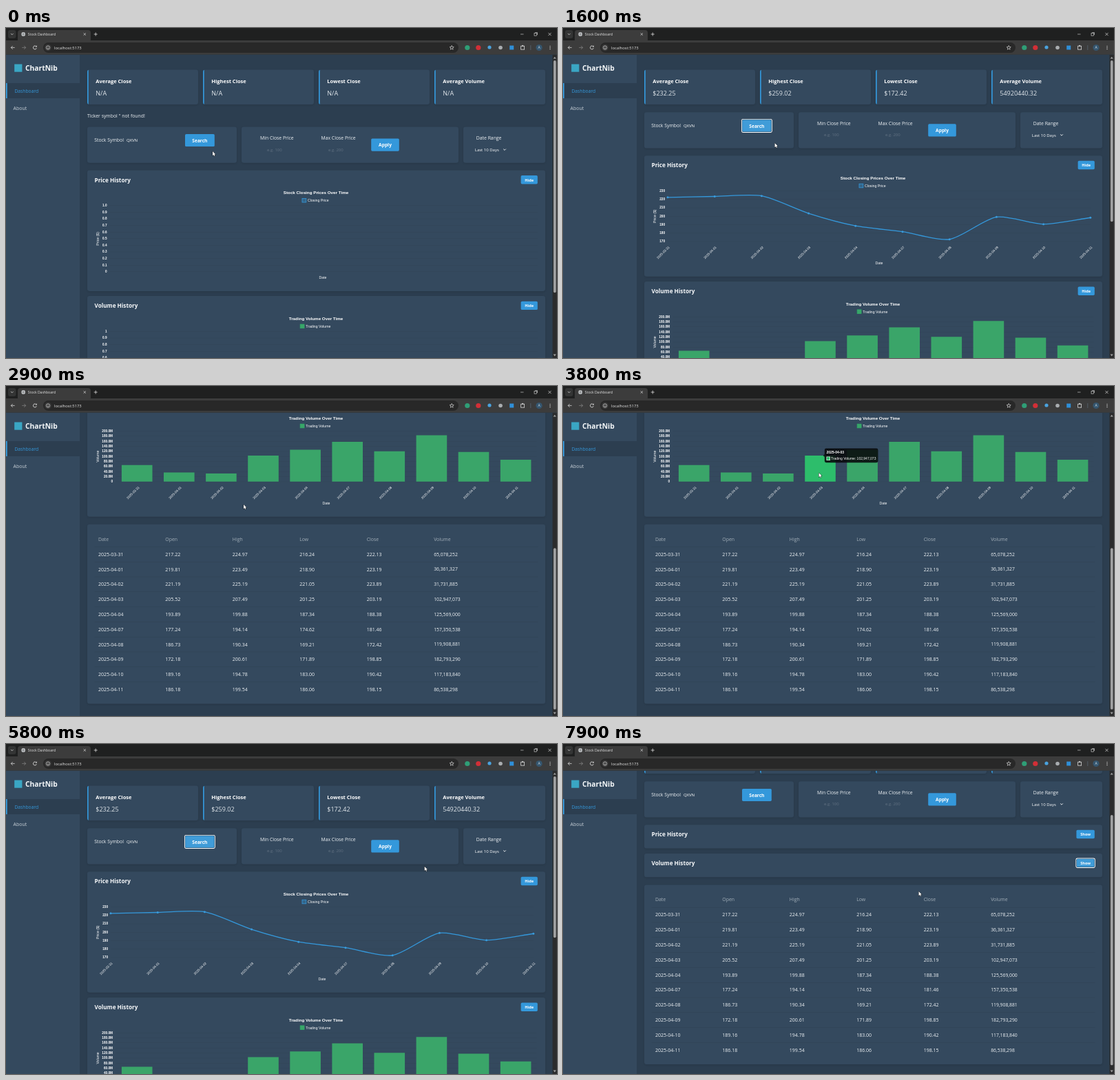
These frames come from a looping animation (800x479 px, 8 s). An HTML page with a canvas:

```html
<!DOCTYPE html>
<html lang="en">
<head>
<meta charset="utf-8">
<title>Stock Dashboard</title>
<style>
html, body { margin: 0; width: 100%; height: 100%; overflow: hidden; background: #2c3e50; }
canvas { display: block; width: 800px; height: 479px; }
</style>
</head>
<body>
<canvas id="stage"></canvas>
<script>
const W = 800, H = 479, LOOP = 8000, STEP = 100;
const canvas = document.getElementById('stage');
const ctx = canvas.getContext('2d');
const dpr = window.devicePixelRatio || 1;
canvas.width = W * dpr;
canvas.height = H * dpr;

const UI = '"Open Sans", "Noto Sans", sans-serif';
const CHART = '"Liberation Sans", Arial, sans-serif';
const CARD = '#34495e', PAGE = '#2c3e50', BLUE = '#3498db', GREEN = '#3aa569';
const TOP = 39;

// day, open, high, low, close, volume
const rows = [
  ['03-31', 217.22, 224.97, 216.24, 222.13, 65078252],
  ['04-01', 219.81, 223.49, 218.90, 223.19, 36361327],
  ['04-02', 221.19, 225.19, 221.05, 223.89, 31731885],
  ['04-03', 205.52, 207.49, 201.25, 203.19, 102947073],
  ['04-04', 193.89, 199.88, 187.34, 188.38, 125569000],
  ['04-07', 177.24, 194.14, 174.62, 181.46, 157350538],
  ['04-08', 186.73, 190.34, 169.21, 172.42, 119908881],
  ['04-09', 172.18, 200.61, 171.89, 198.85, 182793290],
  ['04-10', 189.16, 194.78, 183.00, 190.42, 117183840],
  ['04-11', 186.18, 199.54, 186.06, 198.15, 86538298]
];
const dates = rows.map(r => '2025-' + r[0]);
const commas = n => n.toLocaleString('en-US');

// Timeline
const LOADED = 500, SEARCH_CLICK = 400, PRICE_HIDE = 6300, VOLUME_HIDE = 7100;
const pointer = [
  [0, 300, 179], [350, 285, 165], [800, 285, 165], [1600, 307.5, 167], [2300, 341.5, 175.5],
  [2900, 345, 172], [3500, 371.5, 126], [4100, 371.5, 126], [5000, 424, 153],
  [5400, 424, 153], [6150, 758, 198], [6400, 760, 199], [6700, 770.5, 221],
  [7000, 760, 239], [7250, 758, 238], [7900, 516.5, 214]
];
const scrolling = [
  [0, 0], [1750, 0], [2300, 265], [2650, 353.7], [4200, 353.7], [4850, 133.6],
  [5350, 133.6], [5800, 0], [7350, 0], [7800, 68]
];

function track(keys, t) {
  let i = 0;
  while (i < keys.length - 1 && keys[i + 1][0] <= t) i++;
  const a = keys[i], b = keys[i + 1];
  if (!b) return a.slice(1);
  const u = (t - a[0]) / (b[0] - a[0]), k = u * u * (3 - 2 * u);
  return a.slice(1).map((v, j) => v + (b[j + 1] - v) * k);
}

// Drawing helpers; text y is the middle of the capitals
function text(s, x, y, size, color = '#eef2f5', { weight = 400, font = UI, align = 'left' } = {}) {
  ctx.font = `${weight} ${size}px ${font}`;
  ctx.textAlign = align;
  ctx.fillStyle = color;
  ctx.fillText(s, x, y + size * 0.36);
}
function label(s, x, y, size, align = 'left', weight = 400) {
  text(s, x, y, size, '#fff', { font: CHART, align, weight });
}
function turned(s, x, y, size, angle, align) {
  ctx.save();
  ctx.translate(x, y);
  ctx.rotate(angle);
  label(s, 0, 0, size, align);
  ctx.restore();
}
function box(x, y, w, h, color, r = 0) {
  ctx.fillStyle = color;
  ctx.beginPath();
  ctx.roundRect(x, y, w, h, r);
  ctx.fill();
}
function disc(x, y, r, color) {
  ctx.fillStyle = color;
  ctx.beginPath();
  ctx.arc(x, y, r, 0, 7);
  ctx.fill();
}
function ring(x, y, r, from = 0, to = 7) {
  ctx.beginPath();
  ctx.arc(x, y, r, from, to);
  ctx.stroke();
}
function path(points, color, width = 0.8) {
  ctx.strokeStyle = color;
  ctx.lineWidth = width;
  ctx.beginPath();
  points.forEach(([x, y], i) => i ? ctx.lineTo(x, y) : ctx.moveTo(x, y));
  ctx.stroke();
}
function poly(points, color) {
  ctx.fillStyle = color;
  ctx.beginPath();
  points.forEach(([x, y]) => ctx.lineTo(x, y));
  ctx.fill();
}
function card(x, y, w, h) {
  ctx.save();
  ctx.shadowColor = 'rgba(0,0,0,.12)';
  ctx.shadowBlur = 3 * dpr;
  ctx.shadowOffsetY = dpr;
  box(x, y, w, h, CARD, 3.3);
  ctx.restore();
}
function button(s, x, y, w, h, size, focused) {
  if (focused) {
    box(x - 1, y - 1, w + 2, h + 2, '#fff', 2.4);
    box(x - 0.1, y - 0.1, w + 0.2, h + 0.2, '#24384a', 1.8);
    box(x + 0.3, y + 0.3, w - 0.6, h - 0.6, '#409cd8', 1.6);
  } else {
    box(x, y, w, h, BLUE, 1.7);
  }
  text(s, x + w / 2, y + h / 2 + 0.3, size, '#fff', { weight: 700, align: 'center' });
}

// Browser frame
function browser() {
  box(0, 0, W, 19, '#1f2020');
  box(3, 3, 11.5, 12, '#343535', 3);
  path([[7, 8], [8.8, 9.8], [10.6, 8]], '#d5d5d5');
  box(17, 3, 106, 18, '#3c3c3c', 4);
  box(0, 18, W, 20.5, '#3c3c3c');
  box(0, 38, W, 1, '#333a40');
  disc(25.2, 9, 2.9, '#c6c9cc');
  path([[22.6, 9], [27.8, 9]], '#555', 0.5);
  path([[25.2, 6.4], [25.2, 11.6]], '#555', 0.5);
  text('Stock Dashboard', 31.8, 9, 5.1, '#e4e4e4');
  cross(114.3, 9, 1.7);
  path([[127.7, 9], [132.7, 9]], '#ddd');
  path([[130.2, 6.5], [130.2, 11.5]], '#ddd');
  path([[747, 9], [751.5, 9]], '#ddd', 0.6);
  ctx.strokeRect(767, 7.6, 3.5, 3.5);
  path([[768.2, 6.6], [771.5, 6.6], [771.5, 10]], '#ddd', 0.6);
  cross(789.5, 9, 2.1);

  arrow(10, 28.4, -1, '#d8d8d8');
  arrow(26, 28.4, 1, '#858585');
  ctx.strokeStyle = '#d8d8d8';
  ctx.lineWidth = 0.9;
  ring(42, 28.4, 2.5, 0.3, 5.6);
  poly([[42.6, 27.6], [44.9, 27.6], [44.9, 25.3]], '#d8d8d8');
  box(54, 21, 603, 15, '#282828', 7.5);
  disc(61, 28.5, 4.8, '#3b3b3b');
  ctx.lineWidth = 0.7;
  ring(61, 28.5, 2.6);
  path([[61, 28.2], [61, 30]], '#d8d8d8', 0.7);
  text('localhost:5173', 70, 28.6, 5.9, '#e6e6e6');
  star(647.2, 28.6);

  disc(669.8, 28.5, 3.6, '#2f9e76');
  disc(685.8, 28.5, 3.6, '#d22f36');
  disc(702, 28, 2.6, '#4aa3df');
  disc(718, 28.5, 2.8, '#a9adb0');
  box(731.2, 25.5, 6, 6, '#2f8fd8');
  ctx.strokeStyle = '#d8d8d8';
  ctx.lineWidth = 0.8;
  ctx.strokeRect(747.6, 26.2, 5, 5);
  disc(750.1, 25.8, 1, '#d8d8d8');
  box(761.5, 25, 0.7, 7, '#5a6a78');
  disc(774, 28.5, 4.6, '#35566f');
  text('A', 774, 28.6, 5, '#d8e4ec', { align: 'center' });
  for (const dy of [-2.2, 0, 2.2]) disc(790, 28.5 + dy, 0.65, '#d8d8d8');
}
function cross(x, y, r) {
  path([[x - r, y - r], [x + r, y + r]], '#ddd', 0.7);
  path([[x - r, y + r], [x + r, y - r]], '#ddd', 0.7);
}
function arrow(x, y, dir, color) {
  path([[x - 2.7, y], [x + 2.7, y]], color);
  path([[x + dir * 0.3, y - 2.4], [x + dir * 2.7, y], [x + dir * 0.3, y + 2.4]], color);
}
function star(x, y) {
  const pts = [];
  for (let i = 0; i <= 10; i++) {
    const a = i * Math.PI / 5 - Math.PI / 2, r = i % 2 ? 1.4 : 3.2;
    pts.push([x + r * Math.cos(a), y + r * Math.sin(a)]);
  }
  path(pts, '#d8d8d8', 0.7);
}

function sidebar() {
  box(0, TOP, 107, H - TOP, CARD);
  box(12.2, 52.5, 11.2, 11.2, '#3aa6c4');
  text('ChartNib', 28, 58.6, 10.3, '#f4f7f9', { weight: 700 });
  box(0, 80, 107, 22, PAGE);
  box(0, 80, 1.8, 22, BLUE);
  text('Dashboard', 12.4, 91.2, 6.75, BLUE);
  text('About', 10.5, 116.4, 7, '#c9d1d8');
}

function scrollbar(scroll, height) {
  box(793.5, TOP, 6.5, H - TOP, '#2b2c2d');
  const view = H - TOP, scale = 423 / height;
  box(794.9, 47 + scroll * scale, 3.8, view * scale, '#a0a1a2', 1.9);
  poly([[794.6, 44.6], [798.8, 44.6], [796.7, 41.8]], '#a0a1a2');
  poly([[794.6, 473.6], [798.8, 473.6], [796.7, 476.4]], '#a0a1a2');
}

// Page parts
function stats(loaded) {
  const items = [['Average Close', '$232.25'], ['Highest Close', '$259.02'],
    ['Lowest Close', '$172.42'], ['Average Volume', '54920440.32']];
  items.forEach(([name, value], i) => {
    const x = 118 + i * 168;
    card(x, 60.5, 161, 50.5);
    ctx.save();
    ctx.beginPath();
    ctx.roundRect(x, 60.5, 161, 50.5, 3.3);
    ctx.clip();
    box(x, 60.5, 1.7, 50.5, BLUE);
    ctx.restore();
    text(name, x + 12.3, 77.3, 7.5, '#fff', { weight: 700 });
    text(loaded ? value : 'N/A', x + 12.3, 94.3, 9, '#dfe5ea');
  });
}

function controls(y, focused) {
  card(118, y, 217, 52.3);
  card(342, y, 315, 52.3);
  card(664, y, 119, 52.3);
  text('Stock Symbol', 128.3, y + 19.2, 6.85);
  text('QXVN', 175, y + 19.4, 6, '#fff');
  button('Search', 260, y + 10.7, 42.8, 18, 6.6, focused);
  const dim = 'rgba(170,180,190,.38)';
  text('Min Close Price', 369, y + 16.6, 6.85);
  text('Max Close Price', 457.5, y + 16.6, 6.85);
  text('e.g. 100', 379, y + 33, 6, dim);
  text('e.g. 200', 468, y + 33, 6, dim);
  button('Apply', 530.2, y + 17, 40.6, 18.4, 6.7);
  text('Date Range', 682.8, y + 16.6, 6.85);
  text('Last 10 Days', 680.8, y + 33.2, 6, '#fff');
  path([[722.2, y + 32.2], [724, y + 34], [725.8, y + 32.2]], '#fff', 0.9);
}

function panel(y, title, shown, focused) {
  card(118, y, 665, shown ? 175.5 : 34.4);
  text(title, 128.5, y + 14.3, 8.2, '#f6f8fa', { weight: 700 });
  if (shown) button('Hide', 747.6, y + 7.6, 24.2, 12.4, 5.6, focused);
  else button('Show', 745.4, y + 7.6, 26.4, 12.4, 5.6, focused);
}

function chartHead(y, title, legend, x, color, fill) {
  label(title, 450, y + 32.7, 6.25, 'center', 700);
  box(x, y + 41, 5.8, 5.6, fill);
  ctx.strokeStyle = color;
  ctx.lineWidth = 0.8;
  ctx.strokeRect(x, y + 41, 5.8, 5.6);
  label(legend, x + 8, y + 43.9, 5.2);
}
function grid(y, left, right, names, height, end) {
  names.forEach((s, i) => {
    const gy = y + 51 + height * i / (names.length - 1);
    box(left, gy, right - left, 0.5, 'rgba(0,0,0,.09)');
    label(s, end, gy, 4.7, 'right', 700);
  });
}
function emptyChart(y, axis, top) {
  const names = [top];
  for (let i = 9; i > 0; i--) names.push('0.' + i);
  names.push('0');
  grid(y, 150, 772, names, 96.2, 146.5);
  turned(axis, 133.5, y + 99.5, 5.2, -Math.PI / 2, 'center');
  label('Date', 460, y + 155.8, 5.2, 'center');
}
function dateAxis(y, x0, step, center) {
  dates.forEach((d, i) => turned(d, x0 + i * step, y + 132.2, 4.7, -Math.PI / 4, 'right'));
  label('Date', center, y + 155.6, 5.2, 'center');
}

const pointX = i => 152 + i * 68.2;
const priceY = v => 51 + (230 - v) * 1.225;
const barX = i => 190.2 + i * 61.1;
const volumeY = v => 124.6 - v / 2e8 * 73.6;

function spline(p, tension) {
  const ctrl = p.map((c, i) => {
    const a = p[i - 1] || c, b = p[i + 1] || c;
    const d1 = Math.hypot(c[0] - a[0], c[1] - a[1]), d2 = Math.hypot(b[0] - c[0], b[1] - c[1]);
    const k1 = tension * d1 / (d1 + d2), k2 = tension * d2 / (d1 + d2);
    const dx = b[0] - a[0], dy = b[1] - a[1];
    return [c[0] - k1 * dx, c[1] - k1 * dy, c[0] + k2 * dx, c[1] + k2 * dy];
  });
  ctx.beginPath();
  ctx.moveTo(...p[0]);
  for (let i = 1; i < p.length; i++)
    ctx.bezierCurveTo(ctrl[i - 1][2], ctrl[i - 1][3], ctrl[i][0], ctrl[i][1], ...p[i]);
  ctx.stroke();
}

function priceChart(y, loaded, grow) {
  chartHead(y, 'Stock Closing Prices Over Time', 'Closing Price', 430, BLUE, 'rgba(52,152,219,.35)');
  if (!loaded) return emptyChart(y, 'Price ($)', '1.0');
  grid(y, 152, 766, [230, 220, 210, 200, 190, 180, 170], 73.5, 148);
  turned('Price ($)', 133.5, y + 88, 5.2, -Math.PI / 2, 'center');
  dateAxis(y, 153.8, 68.2, 459);
  const pts = rows.map((r, i) => [pointX(i), y + 124.5 + (priceY(r[4]) - 124.5) * grow]);
  ctx.strokeStyle = BLUE;
  ctx.lineWidth = 1.35;
  spline(pts, 0.25);
  pts.forEach(([px, py]) => disc(px, py, 1.5, '#3a9bdb'));
}

function volumeChart(y, loaded, grow, hover) {
  chartHead(y, 'Trading Volume Over Time', 'Trading Volume', 427.2, '#2fae68', GREEN);
  if (!loaded) return emptyChart(y, 'Volume', '1');
  const names = [];
  for (let v = 200; v > 0; v -= 20) names.push(v.toFixed(1) + 'M');
  grid(y, 159.6, 770.6, names.concat('0'), 73.6, 155);
  turned('Volume', 133, y + 88, 5.2, -Math.PI / 2, 'center');
  dateAxis(y, 192.8, 61.1, 465);
  rows.forEach((r, i) => {
    const h = (124.6 - volumeY(r[5])) * grow;
    box(barX(i) - 22.3, y + 124.6 - h, 44.6, h, i === hover ? '#2dbd6b' : GREEN);
  });
}

function table(y) {
  card(118, y, 665, 260.5);
  const col = i => 133.9 + i * 97.45;
  ['Date', 'Open', 'High', 'Low', 'Close', 'Volume'].forEach((s, i) =>
    text(s, col(i), y + 21.4, 6.9, '#a3afb9'));
  rows.forEach((r, k) => {
    const ry = y + 43.4 + k * 21.8;
    box(128.5, ry - 11, 644, 0.5, 'rgba(0,0,0,.12)');
    text(dates[k], col(0), ry, 7);
    r.slice(1).forEach((v, i) => text(i < 4 ? v.toFixed(2) : commas(v), col(i + 1), ry, i < 4 ? 7 : 6.85));
  });
}

function tooltip(x, y, gap, title, body, color) {
  ctx.font = `400 5px ${CHART}`;
  const w = ctx.measureText(body).width + 12.2, left = x + gap, dark = 'rgba(8,10,12,.88)';
  box(left, y - 10.3, w, 20.6, dark, 2.4);
  poly([[left, y - 2], [left - 2.1, y], [left, y + 2]], dark);
  label(title, left + 2.7, y - 4.6, 5, 'left', 700);
  box(left + 2.7, y + 1.6, 5.4, 5.4, '#fff');
  box(left + 3.3, y + 2.2, 4.2, 4.2, color);
  label(body, left + 9.2, y + 4.4, 5);
}

function cursor(x, y) {
  const pts = [[0, 0], [0, 6.3], [1.5, 5], [2.5, 7.1], [3.4, 6.7], [2.5, 4.6], [4.4, 4.5], [0, 0]]
    .map(([a, b]) => [x + a, y + b]);
  path(pts, 'rgba(0,0,0,.75)', 1);
  poly(pts, '#fff');
}

function draw(t) {
  const loaded = t >= LOADED, showPrice = t < PRICE_HIDE, showVolume = t < VOLUME_HIDE;
  const grow = 1 - Math.pow(1 - Math.min(1, Math.max(0, (t - LOADED) / 1000)), 4);
  const [scroll] = track(scrolling, t), [mx, my] = track(pointer, t);
  const focus = t < SEARCH_CLICK ? '' : showPrice ? 'search' : showVolume ? 'price' : 'volume';

  const top = loaded ? 122.2 : 143.4;
  const priceTop = top + 63;
  const volumeTop = priceTop + (showPrice ? 182.7 : 41.7);
  const tableTop = volumeTop + (showVolume ? 182.7 : 41.7) + 3.9;
  const docHeight = loaded ? tableTop + 240 : 552;

  const py = my + scroll;
  const bar = !loaded || !showVolume ? -1 : rows.findIndex((r, i) => Math.abs(mx - barX(i)) < 22.3 &&
    py > volumeTop + volumeY(r[5]) && py < volumeTop + 124.6);
  const dot = !loaded || !showPrice ? -1 : rows.findIndex((r, i) =>
    Math.hypot(mx - pointX(i), py - priceTop - priceY(r[4])) < 3);

  ctx.setTransform(dpr, 0, 0, dpr, 0, 0);
  box(0, 0, W, H, PAGE);
  ctx.save();
  ctx.beginPath();
  ctx.rect(107, TOP, 687, H - TOP);
  ctx.clip();
  ctx.translate(0, -scroll);
  stats(loaded);
  if (!loaded) text("Ticker symbol '' not found!", 118, 127.5, 6.85);
  controls(top, focus === 'search');
  panel(priceTop, 'Price History', showPrice, focus === 'price');
  if (showPrice) priceChart(priceTop, loaded, grow);
  panel(volumeTop, 'Volume History', showVolume, focus === 'volume');
  if (showVolume) volumeChart(volumeTop, loaded, grow, bar);
  if (loaded) table(tableTop);
  if (bar >= 0) tooltip(barX(bar), volumeTop + volumeY(rows[bar][5]), 6.3, dates[bar],
    'Trading Volume: ' + commas(rows[bar][5]), '#2dbd6b');
  if (dot >= 0) tooltip(pointX(dot), priceTop + priceY(rows[dot][4]), 3.3, dates[dot],
    'Closing Price: ' + rows[dot][4].toFixed(2), '#d6eaf8');
  ctx.restore();

  sidebar();
  scrollbar(scroll, docHeight);
  browser();
  cursor(mx, my);
}

const start = performance.now();
function tick() {
  const t = (performance.now() - start) % LOOP;
  draw(Math.floor(t / STEP) * STEP);
  requestAnimationFrame(tick);
}
tick();
</script>
</body>
</html>
```
